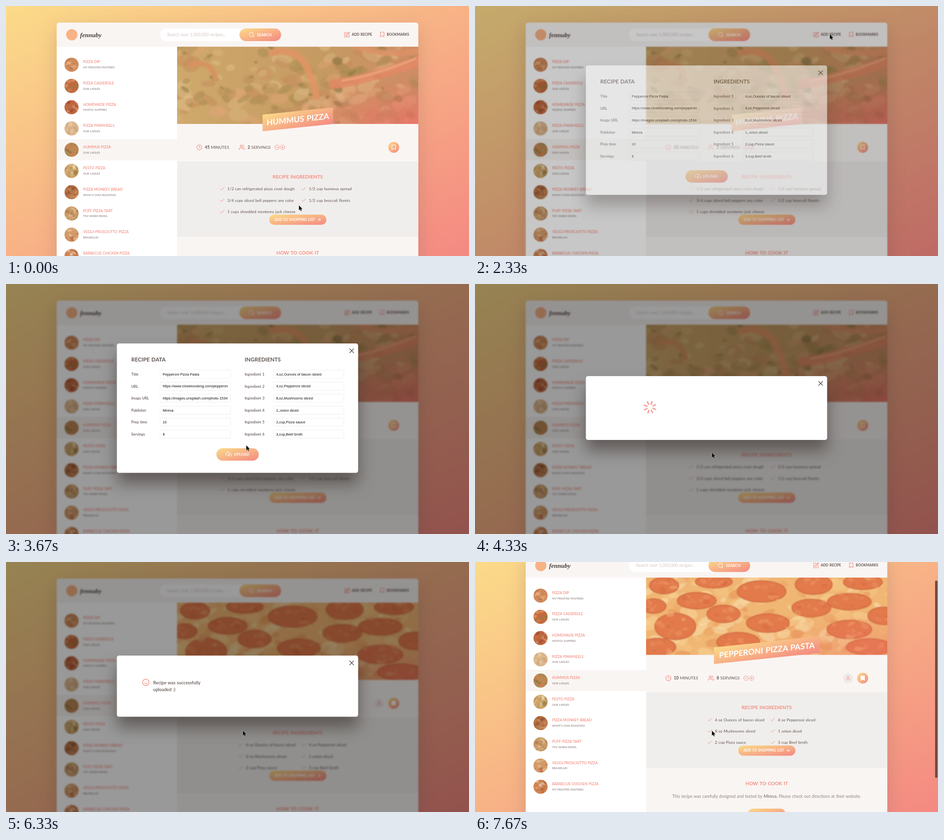
These frames come from a looping animation (950x513 px, 8000 ms). An HTML page:

```html
<!DOCTYPE html>
<html lang="en">
<head>
<meta charset="utf-8">
<title>Recipe upload</title>
<style>
html, body { margin: 0; width: 100%; height: 100%; overflow: hidden; }
body { position: relative; background: linear-gradient(to right bottom, #fbdb89, #f48982); }
svg, #overlay { position: absolute; left: 0; top: 0; width: 950px; height: 513px; }
text { font-family: Lato, "Open Sans", sans-serif; word-spacing: .065em; white-space: pre; }
text.input { font-family: "Liberation Sans", Arial, sans-serif; word-spacing: 0; }
text.brand { font-family: "Liberation Serif", "Times New Roman", serif; font-style: italic; }
.card { filter: drop-shadow(0 12px 18px rgba(97, 85, 81, .22)); }
.panel { filter: drop-shadow(0 22px 16px rgba(60, 50, 47, .6)); }
#overlay { background: rgba(0, 0, 0, .4); backdrop-filter: blur(1.6px); }

#page, #scrollbar, #overlay, #dialog, #cursor, .before, .after, .photo,
.form, .loading, .message, .upload, .spinner { animation: 8s step-end infinite; }
#page { animation-name: scroll; }
#scrollbar { animation-name: scrollbar; }
#overlay, #dialog { animation-name: fade; }
#cursor { animation-name: point; }
.before { animation-name: before; }
.after { animation-name: after; }
.photo { animation-name: photo; }
.form { animation-name: form; }
.loading { animation-name: loading; }
.message { animation-name: after; }
.upload { animation-name: hover; transform-origin: 475px 349.7px; }
.spinner { animation-name: spin; transform-origin: 359px 253px; }

@keyframes scroll { 0% { transform: none } 95.875%, 100% { transform: translateY(-51.6px) } }
@keyframes scrollbar { 0% { opacity: 0 } 95.875%, 100% { opacity: 1 } }
@keyframes fade {
  0% { opacity: 0 } 29.125% { opacity: .55 } 33.375% { opacity: 1 }
  83.375% { opacity: .12 } 87.5%, 100% { opacity: 0 }
}
@keyframes before { 0% { visibility: visible } 62.5%, 100% { visibility: hidden } }
@keyframes after { 0% { visibility: hidden } 62.5%, 100% { visibility: visible } }
@keyframes photo { 0% { visibility: hidden } 79.125%, 100% { visibility: visible } }
@keyframes form { 0% { visibility: visible } 54.125%, 100% { visibility: hidden } }
@keyframes loading {
  0% { visibility: hidden } 54.125% { visibility: visible } 62.5%, 100% { visibility: hidden }
}
@keyframes hover { 0% { transform: none } 50%, 100% { transform: scale(1.05) } }
@keyframes spin { 0% { transform: none } 58.375%, 100% { transform: rotate(60deg) } }
@keyframes point {
  0% { transform: translate(601px, 409px) }
  8.375% { transform: translate(583px, 350px) }
  12.5% { transform: translate(559px, 281px) }
  16.625% { transform: translate(748px, 89px) }
  20.875% { transform: translate(739px, 78px) }
  25% { transform: translate(728px, 58px) }
  37.5% { transform: translate(716px, 84px) }
  41.625% { transform: translate(640px, 190px) }
  45.875% { transform: translate(493px, 331px) }
  50%, 100% { transform: translate(486px, 346px) }
}
</style>
</head>
<body>
<svg viewBox="0 0 950 513">
  <defs>
    <linearGradient id="warm" x1="0" y1="0" x2="1" y2="1">
      <stop stop-color="#fbdb89"/><stop offset="1" stop-color="#f48982"/>
    </linearGradient>
    <linearGradient id="olive">
      <stop stop-color="#cfa96c"/><stop offset=".6" stop-color="#c59a62"/><stop offset="1" stop-color="#d08a66"/>
    </linearGradient>
    <radialGradient id="blush" cx="1" cy="1" r=".6">
      <stop stop-color="#f0706a" stop-opacity=".75"/><stop offset="1" stop-color="#f0706a" stop-opacity="0"/>
    </radialGradient>
    <filter id="soft"><feGaussianBlur stdDeviation="1.8"/></filter>
    <filter id="crisp"><feGaussianBlur stdDeviation=".8"/></filter>
    <clipPath id="hero"><rect x="351" y="83.5" width="495" height="158.5"/></clipPath>
    <clipPath id="disc"><circle r="14.5"/></clipPath>
  </defs>
  <g id="page"></g>
  <rect id="scrollbar" x="944" y="38" width="5" height="405" rx="2.5" fill="#74493f"/>
</svg>
<div id="overlay"></div>
<svg id="dialog" viewBox="0 0 950 513"></svg>
<svg viewBox="0 0 950 513">
  <path id="cursor" d="M0 0V10.3L2.4 8.2 4 11.8 5.8 11 4.3 7.5H7.4Z" fill="#111" stroke="#fff" stroke-width=".7" paint-order="stroke"/>
</svg>
<script>
const PINK = '#f38e82', DARK = '#615551', GREY = '#918581', WARM = 'url(#warm)';

const ICONS = {
  edit: 'M11 4H3v17h17v-8M18.5 2.5l3 3L12 15l-4 1 1-4z',
  bookmark: 'M19 21l-7-5-7 5V3h14z',
  search: 'M19 11a8 8 0 1 1-16 0 8 8 0 0 1 16 0M21 21l-4.4-4.4',
  clock: 'M22 12a10 10 0 1 1-20 0 10 10 0 0 1 20 0M12 6v6l4 2',
  users: 'M17 21v-2a4 4 0 0 0-4-4H5a4 4 0 0 0-4 4v2M13 7a4 4 0 1 1-8 0 4 4 0 0 1 8 0M23 21v-2a4 4 0 0 0-3-3.9M16 3.1a4 4 0 0 1 0 7.8',
  user: 'M20 21v-2a4 4 0 0 0-4-4H8a4 4 0 0 0-4 4v2M16 7a4 4 0 1 1-8 0 4 4 0 0 1 8 0',
  minus: 'M22 12a10 10 0 1 1-20 0 10 10 0 0 1 20 0M8 12h8',
  plus: 'M22 12a10 10 0 1 1-20 0 10 10 0 0 1 20 0M8 12h8M12 8v8',
  check: 'M20 6L9 17l-5-5',
  arrow: 'M5 12h14M12 5l7 7-7 7',
  cloud: 'M16 16l-4-4-4 4M12 12v9M20.4 18.4A5 5 0 0 0 18 9h-1.3A8 8 0 1 0 3 16.3',
  smile: 'M22 12a10 10 0 1 1-20 0 10 10 0 0 1 20 0M8 14s1.5 2 4 2 4-2 4-2M9 9v.1M15 9v.1',
  close: 'M18 6L6 18M6 6l12 12'
};

// y is the middle of the capitals
const text = (x, y, str, size, fill = DARK, weight = 400, extra = '') =>
  `<text x="${x}" y="${y + size * .36}" font-size="${size}" fill="${fill}" font-weight="${weight}" ${extra}>${str}</text>`;
const middle = 'text-anchor="middle"';
const rect = (x, y, w, h, fill, r = 0, extra = '') =>
  `<rect x="${x}" y="${y}" width="${w}" height="${h}" rx="${r}" fill="${fill}" ${extra}/>`;
const circle = (x, y, r, fill) => `<circle cx="${x}" cy="${y}" r="${r}" fill="${fill}"/>`;
const icon = (name, x, y, size, color = PINK, width = 2, fill = 'none') =>
  `<path transform="translate(${x - size / 2} ${y - size / 2}) scale(${size / 24})" d="${ICONS[name]}" fill="${fill}"
    stroke="${color}" stroke-width="${width}" stroke-linecap="round" stroke-linejoin="round"/>`;
const group = (cls, ...parts) => `<g class="${cls}">${parts.join('')}</g>`;

let seed = 7;
const random = () => (seed = seed * 16807 % 2147483647) / 2147483647;
const between = (a, b) => a + (b - a) * random();

function blobs(count, [x, y, w, h], [min, max], colors, opacity) {
  let out = '';
  for (let i = 0; i < count; i++) {
    const cx = x + w * random(), cy = y + h * random(), r = between(min, max);
    out += `<ellipse cx="${cx}" cy="${cy}" rx="${r}" ry="${r * between(.4, .8)}" opacity="${opacity}"
      fill="${colors[i % colors.length]}" transform="rotate(${between(-40, 40)} ${cx} ${cy})"/>`;
  }
  return out;
}

const HERO = [351, 83.5, 495, 158.5];
const hero = (filter, body) => `<g clip-path="url(#hero)"><g filter="url(#${filter})">${body}</g></g>`;
const strip = (d, width, color) =>
  `<path d="${d}" fill="none" stroke="${color}" stroke-width="${width}" stroke-linecap="round" opacity=".85"/>`;

function veggiePhoto() {
  return hero('soft',
    rect(340, 75, 520, 180, 'url(#olive)') +
    blobs(150, HERO, [7, 22], ['#d9b57c', '#b88f58', '#a58a4f', '#dfa577', '#c68b5d', '#e2c08a'], .5) +
    blobs(34, HERO, [4, 11], ['#8d7742', '#7f6d42', '#a68a4a'], .55) +
    strip('M545 96Q598 84 618 128T636 186', 14, '#e29566') +
    strip('M672 160Q740 152 850 112', 20, '#e48a66') +
    strip('M690 153Q750 144 840 108', 4, '#efaa82') +
    strip('M722 84Q770 104 846 92', 12, '#dd9267') +
    strip('M380 120Q425 112 430 150', 11, '#d9925f')) + rect(...HERO, 'url(#blush)');
}

function pepperoniPhoto() {
  const slices = [[388, 100, 30, 17], [490, 92, 38, 13], [588, 112, 50, 22], [695, 98, 38, 20], [796, 93, 40, 15],
    [455, 131, 40, 17], [366, 142, 26, 15], [411, 184, 42, 27], [510, 158, 34, 18], [601, 177, 44, 19],
    [690, 146, 40, 18], [768, 133, 45, 17], [838, 162, 32, 18], [768, 190, 46, 19], [540, 216, 44, 20], [374, 226, 38, 18], [810, 226, 48, 17]];
  const discs = slices.map(([x, y, rx, ry]) =>
    `<ellipse cx="${x}" cy="${y}" rx="${rx}" ry="${ry}" fill="#e27a4b" stroke="#d2683f" stroke-width="2"/>` +
    blobs(7, [x - rx * .7, y - ry * .6, rx * 1.4, ry * 1.2], [3, 8], ['#ec9160', '#d86c45', '#e88556'], .6)).join('');
  return hero('crisp',
    rect(340, 75, 520, 180, '#f0b673') +
    blobs(150, HERO, [6, 20], ['#f7d296', '#eba566', '#f6c582', '#e7965a', '#f9dda9'], .6) + discs +
    blobs(45, HERO, [3, 9], ['#f5c587', '#f0a86c'], .4)) + rect(...HERO, 'url(#blush)', 0, 'opacity=".5"');
}

const RECIPES = [
  ['PIZZA DIP', 'MY FROSTED PANTRIES', '#cf8a5c', '#e9b47f', '#b5613c'],
  ['PIZZA CASSEROLE', 'OUR LADLES', '#c4683f', '#7d8a45', '#e2a36a'],
  ['HOMEMADE PIZZA', 'MOSTLY SUPPERS', '#c06a42', '#efd2a8', '#9c3f2a'],
  ['PIZZA PINWHEELS', 'OUR LADLES', '#dcb68c', '#eed7b3', '#c48d5c'],
  ['HUMMUS PIZZA', 'OUR LADLES', '#b98a55', '#7f7040', '#d8794f'],
  ['PESTO PIZZA', 'OUR LADLES', '#cfa468', '#f0dcb2', '#8d7440'],
  ['PIZZA MONKEY BREAD', 'WHAT\'S OMA ROASTING', '#b97748', '#dba878', '#8a4a30'],
  ['PUFF PIZZA TART', 'TKV WARM BOWL', '#c99a66', '#e8caa0', '#a0623a'],
  ['VEGGI-PROSCIUTTO PIZZA', 'BRAISELLIO', '#d39a68', '#f0d8b4', '#bb5f40'],
  ['BARBECUE CHICKEN PIZZA', 'MY FROSTED PANTRIES', '#d08350', '#f0dcc0', '#a34c2c']
];

function preview([title, publisher, base, light, dark], i) {
  const y = 120.5 + i * 43.6;
  return (i === 4 ? rect(104, 273, 247, 43.5, '#f9f5f3') : '') +
    `<g transform="translate(134.5 ${y})" clip-path="url(#disc)">${circle(0, 0, 15, base)}
      <g filter="url(#crisp)">${blobs(26, [-14, -14, 28, 28], [1.5, 5], [light, dark, base], .65)}</g></g>` +
    text(158.3, y - 5.7, title, 7.35, PINK, 600) + text(158.3, y + 5.7, publisher, 5.7, GREY, 600);
}

const pillLabel = (x, y, str, size) => text(x, y, str, size, '#fff', 700);

const header =
  `<path d="M104 83.5V39.5a5.5 5.5 0 0 1 5.5-5.5h731a5.5 5.5 0 0 1 5.5 5.5v44z" fill="#f9f5f3"/>` +
  circle(135, 59, 11.5, '#f8b285') +
  text(152, 59, 'fennuby', 13, '#4a403d', 700, 'class="brand"') +
  rect(316, 46, 248, 26, '#fff', 13) + rect(479, 46, 85.5, 26, WARM, 13) +
  text(330.5, 59, 'Search over 1,000,000 recipes...', 8.55, '#d3c7c3') +
  icon('search', 504, 59, 12.5, '#fff') + pillLabel(515, 59, 'SEARCH', 7.7) +
  icon('edit', 700, 58.5, 13) + text(709.5, 58.5, 'ADD RECIPE', 7.1, DARK, 700) +
  icon('bookmark', 772, 58.5, 12.5) + text(781.3, 58.5, 'BOOKMARKS', 7.1, DARK, 700);

const banner = (title, width) =>
  `<g transform="translate(598.8 232.5) skewY(-6)">${rect(-width / 2, -17, width, 34, WARM)}
    ${text(0, 0, title, 16.4, '#fff', 700, middle)}</g>`;

const details = (minutes, servings) =>
  text(408, 290, `<tspan font-weight="700">${minutes}</tspan> MINUTES`, 8.45) +
  text(495.7, 290, `<tspan font-weight="700">${servings}</tspan> SERVINGS`, 8.45);

const ingredients = (left, items) => items.map((item, i) => {
  const x = i % 2 ? 621.5 : left, y = 375.2 + 23.4 * (i >> 1);
  return icon('check', x - 10.5, y, 12) + text(x, y, item, 8.1);
}).join('');

const recipe =
  rect(351, 83.5, 495, 800, '#f9f5f3') + rect(351, 319, 495, 155, '#f0eeec') +
  icon('clock', 396.7, 290, 12.5) + icon('users', 484.2, 290, 12.5) +
  icon('minus', 556, 290, 11) + icon('plus', 567.5, 290, 11) +
  circle(795.5, 290, 11.2, WARM) +
  text(598.5, 350, 'RECIPE INGREDIENTS', 10.1, PINK, 700, middle) +
  text(598.5, 506, 'HOW TO COOK IT', 10.05, PINK, 700, middle) +
  group('before',
    veggiePhoto(), banner('HUMMUS PIZZA', 144.5), details(45, 2), icon('bookmark', 795.5, 290, 12.5, '#fff'),
    ingredients(454.3, ['1/2 can refrigerated pizza crust dough', '1/2 cup hummus spread',
      '3/4 cups sliced bell peppers any color', '1/2 cup broccoli florets', '1 cups shredded monterey jack cheese'])) +
  group('after',
    rect(...HERO, WARM, 0, 'opacity=".6"'), group('photo', pepperoniPhoto()), banner('PEPPERONI PIZZA PASTA', 217),
    details(10, 8), circle(765.5, 290, 10, '#eeeae8'), icon('user', 765.5, 290, 11),
    icon('bookmark', 795.5, 290, 12.5, '#fff', 2, '#fff'),
    ingredients(492.3, ['4 oz Ounces of bacon sliced', '4 oz Pepperoni sliced', '8 oz Mushrooms sliced',
      '1 onion diced', '2 cup Pizza sauce', '3 cup Beef broth']),
    text(598.5, 533, 'This recipe was carefully designed and tested by <tspan font-weight="700">Mireva</tspan>. Please check out directions at their website.',
      8.6, GREY, 400, middle)) +
  rect(540, 428, 117.5, 21, WARM, 10.5) + pillLabel(550.7, 438.5, 'ADD TO SHOPPING LIST', 7.2) +
  icon('arrow', 642.3, 438.5, 10, '#fff', 2.4) +
  rect(560, 557.5, 77, 21, WARM, 10.5);

document.getElementById('page').innerHTML =
  rect(104, 34, 742, 850, '#fff', 5.5, 'class="card"') + header + RECIPES.map(preview).join('') + recipe;

const panel = (top, height) =>
  rect(227.5, top, 495, height, '#fff', 4.5, 'class="panel"') + icon('close', 709.2, top + 15, 16.5, '#4a4240');

const fields = (x, rows) => rows.map(([label, value], i) => {
  const y = 185.2 + 24.6 * i, left = x + 59;
  return text(x, y, label, 7.5, DARK, 600) + rect(left, y - 8.5, 144.5, 17, '#fff', 2, 'stroke="#eeebea" stroke-width=".8"') +
    `<svg x="${left + 5.5}" y="${y - 8}" width="133.5" height="16" style="position:static">
      ${text(0, 8, value, 7.4, '#111', 400, 'class="input"')}</svg>`;
}).join('');

const spokes = Array.from({ length: 8 }, (_, i) =>
  `<path d="M359 246.5v-6" transform="rotate(${20 + i * 45} 359 253)" stroke="${PINK}" stroke-width="2.2" stroke-linecap="round"/>`);

document.getElementById('dialog').innerHTML =
  group('form', panel(122, 265.5),
    text(257, 155.3, 'RECIPE DATA', 11.3, DARK, 700), text(489.7, 155.3, 'INGREDIENTS', 11.3, DARK, 700),
    fields(257, [['Title', 'Pepperoni Pizza Pasta'], ['URL', 'https://www.closetcooking.com/pepperoni-pizza'],
      ['Image URL', 'https://images.unsplash.com/photo-153498'], ['Publisher', 'Mireva'], ['Prep time', '10'], ['Servings', '8']]),
    fields(489.7, ['4,oz,Ounces of bacon sliced', '4,oz,Pepperoni sliced', '8,oz,Mushrooms sliced', '1,,onion diced',
      '2,cup,Pizza sauce', '3,cup,Beef broth'].map((value, i) => [`Ingredient ${i + 1}`, value])),
    group('upload', rect(431.7, 337, 87, 25.5, WARM, 12.7), icon('cloud', 457, 349.7, 12.5, '#fff'),
      pillLabel(467.5, 349.7, 'UPLOAD', 7.7))) +
  group('loading', panel(189, 131), group('spinner', ...spokes)) +
  group('message', panel(192, 125.5), icon('smile', 287, 247, 16),
    text(302, 247.7, 'Recipe was successfully', 9.2, DARK, 600), text(302, 261.5, 'uploaded :)', 9.2, DARK, 600));
</script>
</body>
</html>
```
